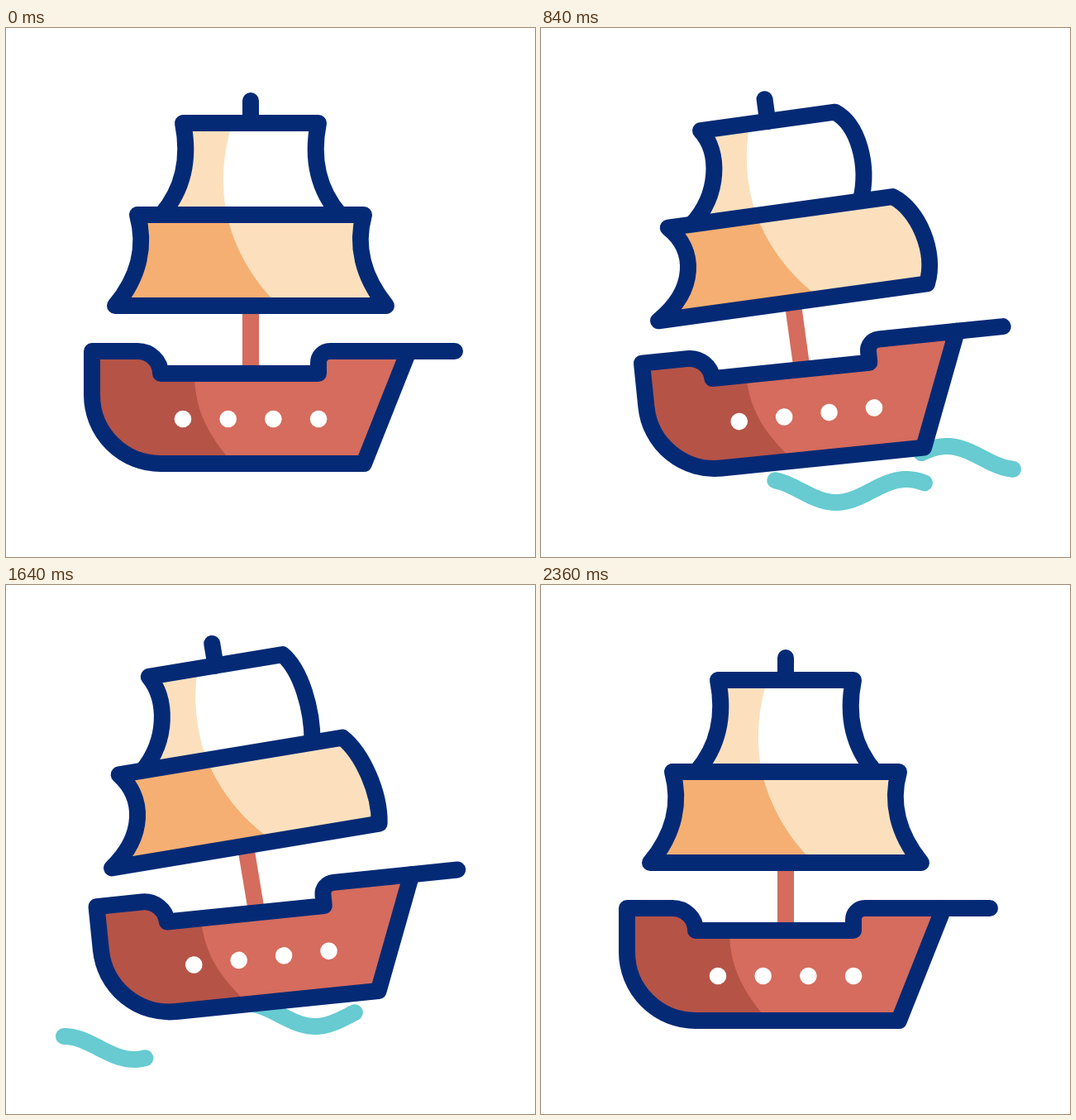
An HTML page with a canvas for the animation above (2400 ms loop, 640 by 640 pixels).

```html
<!DOCTYPE html>
<html>
<head>
<meta charset="utf-8">
<style>
html, body { margin: 0; width: 100%; height: 100%; overflow: hidden; background: #fff; }
canvas { display: block; width: 640px; height: 640px; }
</style>
</head>
<body>
<canvas id="stage" width="640" height="640"></canvas>
<script>
const ctx = document.getElementById('stage').getContext('2d');
const LOOP = 2400;
const NAVY = '#042a76', RED = '#d56c5d', MAROON = '#b55347';
const PEACH = '#fce0be', ORANGE = '#f6af72', TEAL = '#67cbd1';

const mix = (from, to, k) => from + (to - from) * k;
const mixAll = (from, to, k) => from.map((v, i) => mix(v, to[i], k));
const progress = (t, t0, t1) => Math.min(1, Math.max(0, (t - t0) / (t1 - t0)));

// Rocks between evenly spaced extremes, easing in and out of each
function sway(t, start, step, ...extremes) {
  const beat = Math.min(extremes.length - 1, Math.max(0, (t - start) / step));
  const i = Math.min(extremes.length - 2, Math.floor(beat));
  return mix(extremes[i], extremes[i + 1], (1 - Math.cos(Math.PI * (beat - i))) / 2);
}

function fill(d, color) {
  ctx.fillStyle = color;
  ctx.fill(new Path2D(d));
}

function stroke(d, color = NAVY) {
  ctx.strokeStyle = color;
  ctx.stroke(new Path2D(d));
}

function rotateAt(x, y, degrees) {
  ctx.translate(x, y);
  ctx.rotate(degrees * Math.PI / 180);
  ctx.translate(-x, -y);
}

// A sine line that drifts left while both of its ends are trimmed
function wave(t, left, right, trough, y) {
  if (right - left < .5) return;
  const drift = .04 * (t - 640);
  let d = '';
  for (let u = left; ; u = Math.min(u + 3, right)) {
    const level = y + 14 * Math.cos(Math.PI * (u - trough) / 85);
    d += `${d ? 'L' : 'M'}${u - drift},${level}`;
    if (u >= right) break;
  }
  stroke(d, TEAL);
}

function topSail(wind) {
  const [a, b, c, d] = mixAll([221, 150, 219, 190], [237, 143, 227, 196], wind);
  const right = mixAll([371, 150, 373, 190, 404, 226], [410, 130, 419, 182, 392, 226], wind);
  const leftEdge = `M188,226C${c},${d} ${a},${b} 214,115`;
  const outline = `${leftEdge}H378C${right}`;
  fill(outline, '#fff');
  fill(`${leftEdge}H274Q256,170 267,226Z`, PEACH);
  stroke('M296,88V115');
  stroke(outline);
}

function mainSail(wind) {
  const [a, b, c, d] = mixAll([169, 262, 162, 300], [193, 256, 187, 306], wind);
  const right = mixAll([423, 262, 431, 300], [470, 242, 486, 300], wind);
  const leftEdge = `M132,336C${c},${d} ${a},${b} 159,226`;
  const outline = `${leftEdge}H433C${right} 460,336Z`;
  fill(outline, PEACH);
  fill(`${leftEdge}H267C276,265 297,304 330,336Z`, ORANGE);
  stroke(outline);
}

function hull() {
  const deck = 'M104,391H159A28,27 0 0 1 187,418';
  const stern = 'H187A83,83 0 0 1 104,444Z';
  const outline = `${deck}H378V405A14,14 0 0 1 392,391H487L433,527${stern}`;
  fill(outline, RED);
  fill(`${deck}H228C228,460 243,491 275,527${stern}`, MAROON);
  stroke(outline);
  stroke('M487,391H543');
  ctx.fillStyle = '#fff';
  for (let i = 0; i < 4; i++) {
    ctx.beginPath();
    ctx.arc(214 + i * 54.7, 473, 10.3, 0, 7);
    ctx.fill();
  }
}

function draw(t) {
  const x = 33.6 * (progress(t, 0, 1045) ** 1.3 - progress(t, 1045, 2010));
  const y = sway(t, 20, 505, 0, -23.8, 3, -24.4, 0);
  const tilt = sway(t, 130, 530, 0, -10, 6, -6.5, 0);
  const lean = sway(t, 70, 520, 0, -2.9, -1.1, -3.6, 0);
  const wind = sway(t, 90, 430, 0, 1, .8, 1.12, .42, 0);

  ctx.clearRect(0, 0, 640, 640);
  ctx.lineWidth = 20;
  ctx.lineCap = ctx.lineJoin = 'round';

  wave(t, mix(579, 329, progress(t, 230, 1610)), mix(579, 329, progress(t, 990, 2380)), 414, 520);
  wave(t, mix(535, 110, progress(t, 197, 1320)), mix(535, 110, progress(t, 650, 1940)), 365, 560);

  ctx.save();
  ctx.translate(x, y);
  rotateAt(296, 473, tilt);
  ctx.save();
  rotateAt(296, 418, lean);
  stroke('M296,336V418', RED);
  topSail(wind);
  mainSail(wind);
  ctx.restore();
  hull();
  ctx.restore();
}

function tick() {
  draw(performance.now() % LOOP);
  requestAnimationFrame(tick);
}
tick();
</script>
</body>
</html>
```
